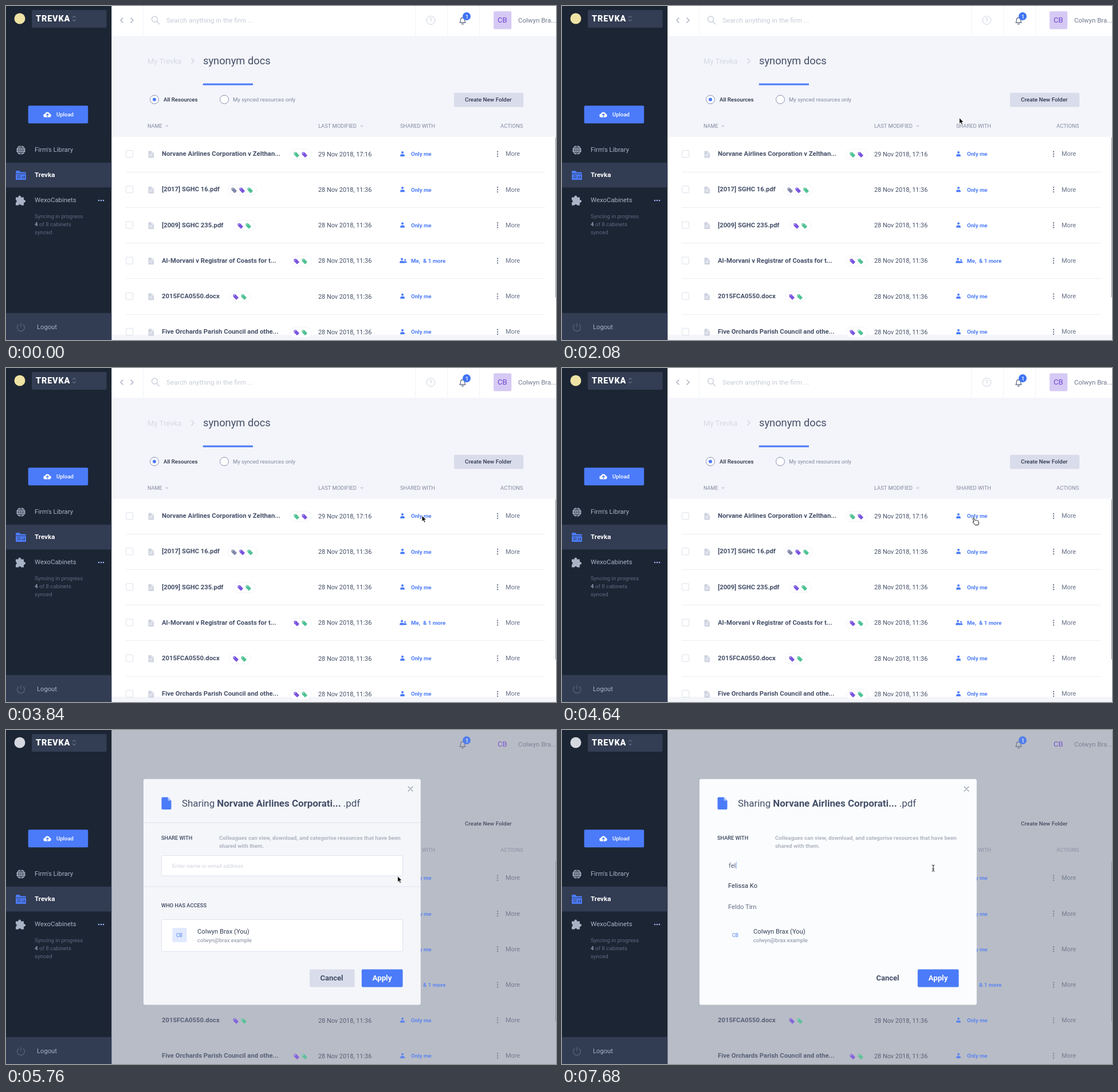
An HTML page for the animation above (8000 ms loop, 960 by 584 pixels).

```html
<!DOCTYPE html>
<html lang="en">
<head>
<meta charset="utf-8">
<title>Sharing a document</title>
<style>
  html, body { margin: 0; width: 100%; height: 100%; overflow: hidden; }
  svg { display: block; width: 960px; height: 584px; font-family: Roboto, sans-serif; }
  .line { fill: none; stroke-linecap: round; stroke-linejoin: round; }
</style>
</head>
<body>
<svg id="stage" viewBox="0 0 960 584"></svg>
<script>
const BLUE = '#4b7bf8', INK = '#444f68', GREY = '#8289a0', PALE = '#cbd0dd', RULE = '#eaedf3';
const GREEN = '#4fc294', PURPLE = '#7a55df', SLATE = '#7f88a9', NAV = '#a9b3c6';

const text = (x, y, str, size, fill = INK, weight = 400, extra = '') =>
  `<text x="${x}" y="${y}" font-size="${size}" fill="${fill}" font-weight="${weight}" ${extra}>${str}</text>`;
const rect = (x, y, w, h, fill, r = 0, stroke = 'none') =>
  `<rect x="${x}" y="${y}" width="${w}" height="${h}" rx="${r}" fill="${fill}" stroke="${stroke}"/>`;
const disc = (x, y, r, fill, stroke = 'none') =>
  `<circle cx="${x}" cy="${y}" r="${r}" fill="${fill}" stroke="${stroke}"/>`;
const shape = (d, fill, x = 0, y = 0) => `<path d="${d}" fill="${fill}" transform="translate(${x} ${y})"/>`;
const line = (d, stroke, width = 1, x = 0, y = 0) =>
  `<path class="line" d="${d}" stroke="${stroke}" stroke-width="${width}" transform="translate(${x} ${y})"/>`;
const group = (id, ...parts) => `<g id="${id}">${parts.join('')}</g>`;

const tag = (x, y, fill) =>
  shape('M-4.5-3.5q0-1 1-1h3l5 5q.6.6 0 1.200l-2.800 2.800q-.6.6-1.200 0l-5-5z', fill, x, y) + disc(x - 2.6, y - 2.6, .8, '#fff');
const person = (x, y, scale = 1) =>
  `<g transform="translate(${x} ${y}) scale(${scale})">` +
  disc(0, -2.6, 2, BLUE) + shape('M-3.800 4.500v-1.500q0-2.500 2.500-2.500h2.600q2.500 0 2.500 2.500v1.500z', BLUE) + '</g>';
const page = (x, y) =>
  shape('M0 1q0-1 1-1h5l3.500 3.500v7.500q0 1-1 1h-7.500q-1 0-1-1z', '#cdd2df', x, y) +
  line('M2 6h5M2 8.500h5M6 .500v3h3', '#fff', .9, x, y);

const rows = [
  ['Norvane Airlines Corporation v Zelthan...', 507, [GREEN, PURPLE]],
  ['[2017] SGHC 16.pdf', 398, [SLATE, PURPLE, GREEN]],
  ['[2009] SGHC 235.pdf', 409, [PURPLE, GREEN]],
  ['Al-Morvani v Registrar of Coasts for t...', 507, [PURPLE, GREEN]],
  ['2015FCA0550.docx', 401, [PURPLE, GREEN]],
  ['Five Orchards Parish Council and othe...', 507, [PURPLE, GREEN]],
].map(([name, tagX, tags], i) => ({ name, tagX, tags, i, y: 258.5 + i * 62.2 }));

// Pale parts of a row vanish under the dimmed backdrop.
const rowPale = ({ tagX, tags, i, y }) =>
  rect(209.5, y - 6, 12, 12, '#fff', 1, '#dde1ea') + page(248.5, y - 5) +
  rect(tagX - 11, y - 8, tags.length * 14 + 9, 18, '#fff', 9, '#f1f3f8') +
  (i < 5 ? rect(209, Math.round(y + 31.2), 732, 1, RULE) : '');

const rowInk = ({ name, tagX, tags, i, y }) =>
  text(272, y + 3.7, name, 11.3, INK, 600) +
  tags.map((c, k) => tag(tagX + k * 14, y + 1.5, c)).join('') +
  text(545, y + 4.3, (i ? '28 Nov 2018, 11:36' : '29 Nov 2018, 17:16'), 10.9) +
  (i === 3 ? person(691, y) + person(696.5, y + .8, .75) : person(692, y)) +
  text(707, y + 3.8, i === 3 ? 'Me,&#160; &amp; 1 more' : 'Only me', 9.7, BLUE, 600) +
  [-4, 0, 4].map(d => disc(858, y + d + .3, 1.2, '#737c92')).join('') +
  text(872, y + 3.8, 'More', 10.9, '#667087');

const sidebar = group('sidebar',
  rect(0, 0, 184.2, 584, '#1c2533'),
  '<circle id="logo" cx="24" cy="22" r="9.5"/>',
  rect(45, 7, 130.6, 31.1, '#333d53', 2),
  text(52, 27, 'TREVKA', 14.5, '#fff', 900, 'letter-spacing=".8"'),
  line('M-2.500-2l2.500-2.500 2.500 2.500M-2.500 2l2.500 2.500 2.500-2.500', '#8a94aa', 1, 119, 22),
  rect(38.7, 174.2, 104.5, 31.1, BLUE, 2),
  shape('M3 10a3 3 0 0 1-.3-6a4.200 4.200 0 0 1 8-.2a3.200 3.200 0 0 1 .3 6.200z', '#fff', 65.5, 184.5),
  line('M0 3v-5M-2 0l2-2 2 2', BLUE, 1.2, 72.3, 190.5),
  text(88, 193, 'Upload', 9.5, '#fff', 500),
  disc(26, 252, 7.8, NAV),
  line('M-8 0h16M-7-4h14M-7 4h14M0-8v16M0-8q-8 8 0 16M0-8q8 8 0 16', '#1c2533', .8, 26, 252),
  text(50, 255, 'Firm\'s Library', 11.4, NAV),
  rect(0, 273.8, 184.2, 43.5, '#323c53'),
  shape('M0 1.500q0-1.500 1.500-1.500h5l2 2.500h8q1.500 0 1.500 1.500v1h-18zM0 6h18v9q0 1-1 1h-16q-1 0-1-1z', BLUE, 17, 288),
  line('M3 9h5M3 12h5M12 10v3M15 9v4', '#323c53', 1.2, 17, 288),
  text(50, 298.5, 'Trevka', 11.6, '#fff', 700),
  shape('M0 4h4.500a2.400 2.400 0 1 1 4.600 0h4.900v4.600a2.400 2.400 0 1 1 0 4.600v4.800h-4.600a2.400 2.400 0 0 0-4.600 0h-4.800v-4.800a2.400 2.400 0 0 0 0-4.600z', NAV, 17, 330.5),
  text(50, 342.5, 'WexoCabinets', 11.4, NAV),
  [162, 166, 170].map(x => disc(x, 340, 1.3, '#9db5f5')).join(''),
  text(50, 371, 'Syncing in progress', 9.7, '#5d6a85'),
  text(50, 385, '<tspan font-weight="700" fill="#8d9ab4">4</tspan> of 8 cabinets', 9.7, '#5d6a85'),
  text(50, 399, 'synced', 9.7, '#5d6a85'),
  rect(0, 536.8, 184.2, 48, '#323c53'),
  line('M-4-5a6.500 6.500 0 1 0 8 0M0-7v6', '#5b667f', 1.2, 26, 562),
  text(54, 564.5, 'Logout', 11.2, NAV));

const pale = group('pale',
  rect(184, 0, 776, 52.2, '#fff'),
  rect(184, 228.8, 776, 346, '#fff'),
  [239, 714, 770, 826].map(x => rect(x, 0, 1, 52, '#f1f3f8')).join(''),
  line('M2-4l-4 4 4 4M16-4l4 4-4 4', '#a2a9b9', 1.3, 202, 25),
  `<g stroke-width="1.500">${disc(259.5, 23, 5, 'none', PALE)}</g>`,
  line('M263 27l4.500 4.500', PALE, 1.5),
  text(280, 29, 'Search anything in the firm ...', 11.75, '#c6cbd8'),
  disc(741.5, 25, 7.3, 'none', PALE),
  text(738.7, 29, '?', 11, PALE),
  rect(851.1, 9.3, 31.1, 31.1, '#d6c9f4', 2),
  text(247, 101, 'My Trevka', 13.1, '#d5d9e4'),
  line('M-2-4l4 4-4 4', PALE, 1.2, 326, 96),
  text(344, 102, 'synonym docs', 18.3, INK),
  rect(343.8, 135.4, 87.1, 3.1, BLUE),
  disc(259, 163.5, 7.5, '#fff', '#8792ae'), disc(259, 163.5, 3, BLUE),
  text(275, 167, 'All Resources', 9.7, '#273146', 500),
  disc(381, 163.5, 7.5, '#fff', '#8792ae'),
  text(396, 167, 'My synced resources only', 9.5, GREY),
  rect(782, 151.7, 121.2, 24.9, '#d9dcea', 2),
  [281, 621].map(x => shape('M-3-1.500h6l-3 3.500z', PALE, x, 210)).join(''),
  rows.map(rowPale).join(''));

const ink = group('ink',
  line('M-5 4h10q-1.500-1.500-1.500-5q0-3.500-3.500-3.500t-3.500 3.500q0 3.500-1.500 5zM-1.500 6.500h3', '#667087', 1.3, 797, 25),
  disc(804, 18, 7, '#3f73f2'),
  text(802, 21.5, '1', 9, '#fff', 500),
  text(858, 29, 'CB', 13, '#6c45d0'),
  text(894, 29, 'Colwyn Bra...', 11.5, '#6e778d'),
  text(801, 167, 'Create New Folder', 9.9, '#2f3950', 500),
  text(247, 213, 'NAME', 9.1, GREY),
  text(545, 213, 'LAST MODIFIED', 9.35, GREY),
  text(688, 213, 'SHARED WITH', 9.4, GREY),
  text(863, 213, 'ACTIONS', 9.5, GREY),
  rows.map(rowInk).join(''));

const modal = group('modal',
  '<rect id="sheet" x="240" y="85.700" width="483.800" height="394.800" rx="3"/>',
  line('M-4-4l8 8M4-4l-8 8', '#9299a8', 1.1, 706, 103),
  shape('M0 2q0-2 2-2h9l6 6v13.500q0 2-2 2h-13q-2 0-2-2z', BLUE, 271.5, 117.5),
  shape('M0 0v6h6z', '#a9c1fc', 282.5, 117.5),
  text(307, 134, 'Sharing <tspan font-weight="600">Norvane Airlines Corporati...</tspan> .pdf', 16.9),
  group('frames',
    rect(240, 161.5, 484, 1, '#dee2ed'), rect(240, 273.5, 484, 1, '#e2e6ef'),
    rect(271.5, 219.5, 421, 35.5, '#fff', 2, '#dfe3ee'),
    rect(271.5, 331.5, 421, 55.5, '#fff', 2, '#dfe3ee'),
    rect(290.5, 346, 25, 25, '#e0e9fd', 2),
    rect(530, 418.4, 78.5, 31.1, '#d9dcea', 2)),
  text(271, 192, 'SHARE WITH', 9.2, '#3b465e', 500),
  text(372, 191.5, 'Colleagues can view, download, and categorise resources that have been', 9.7, '#b0b4c0', 600),
  text(372, 206, 'shared with them.', 9.7, '#b0b4c0', 600),
  text(290, 240.5, 'Enter name or email address', 9.75, '#d0d4df', 400, 'id="hint"'),
  text(291, 240.5, '', 11, '#566078', 400, 'id="typed"'),
  '<rect id="caret" y="230.500" width="1" height="12" fill="#7fa3f5"/>',
  text(271, 309.5, 'WHO HAS ACCESS', 9.3, '#3b465e', 500, 'id="access"'),
  group('matches',
    text(290, 276, 'Felissa Ko', 11.2, '#273146'),
    text(290, 313, 'Feldo Tirn', 11.2, '#667087')),
  text(297, 361.5, 'CB', 8.6, '#6f96f8', 500),
  text(334, 356, 'Colwyn Brax (You)', 11.2, '#343f57'),
  text(334, 370.5, 'colwyn@brax.example', 9.5, GREY),
  text(548.5, 438, 'Cancel', 13, INK, 600),
  rect(620.8, 418.4, 71.7, 31.1, BLUE, 2),
  text(639.5, 438, 'Apply', 13.3, '#fff', 700));

const pointers = group('pointer',
  '<path id="arrow" d="M0 0v10.500l2.400-2.200 1.700 3.900 1.900-.8-1.700-3.800h3.300z" fill="#111" stroke="#fff" stroke-width=".8"/>',
  '<path id="hand" d="M0 1q1.500-2 2.600 0l1 3.500q1-1 2 0q1-.9 2 .2q1.400-.6 2 .8l.9 3.500-1 3.500h-5.500l-3.500-4.500q-.9-1.700 1.300-1.200z" fill="#fff" stroke="#111" stroke-width="1" transform="translate(-3.500 0)"/>',
  '<path id="beam" class="line" d="M-2-6q2 0 2 1.500v8q0 1.500-2 1.500M2-6q-2 0-2 1.500M2 5q-2 0-2-1.500M-1.500 1h3" stroke="#222"/>');

stage.innerHTML = '<rect id="backdrop" width="960" height="584"/>' + pale + ink +
  '<rect id="scrollbar" x="959" y="229.500" width="1" height="280" fill="#8e929b"/>' + sidebar + modal + pointers;

const $ = id => document.getElementById(id);
const show = (id, on) => $(id).setAttribute('display', on ? 'inline' : 'none');
const paint = (id, colour) => $(id).setAttribute('fill', colour);

// Pointer stops: time, x, y
const path = [
  [480, 706, -20], [960, 699, 150], [1120, 699, 150], [2080, 693.5, 195.5], [2240, 693.5, 197],
  [3360, 728, 253], [3840, 726, 258], [4480, 720.5, 262], [4960, 720.5, 262],
  [5280, 705, 260], [5600, 692, 258], [5760, 683.5, 255.5], [6400, 648, 242], [8000, 648, 242],
];
function pointerAt(t) {
  const i = path.findIndex(p => p[0] > t);
  if (i < 1) return [0, -50];
  const [t0, x0, y0] = path[i - 1], [t1, x1, y1] = path[i];
  const k = (t - t0) / (t1 - t0);
  return [x0 + (x1 - x0) * k, y0 + (y1 - y0) * k];
}

function draw(now) {
  const t = Math.floor(now % 8000 / 160) * 160;
  const open = t >= 4960, typing = t >= 7360;
  const typed = 'fel'.slice(0, Math.max(0, (t - 7200) / 160));

  paint('backdrop', open ? '#b8bcc6' : '#f4f5fa');
  paint('logo', open ? '#d5d8df' : '#eee3a4');
  paint('sheet', typing ? '#fafcfe' : '#f4f6fa');
  $('ink').setAttribute('opacity', open ? .83 : 1);
  show('pale', !open);
  show('modal', open);
  show('scrollbar', !open || t >= 5280);
  show('frames', !typing);
  show('hint', !typing);
  show('access', t < 7520);
  show('matches', t >= 7520);
  $('typed').textContent = typed;
  show('caret', t >= 6880);
  $('caret').setAttribute('x', typed ? 291.5 + $('typed').getComputedTextLength() : 290);

  const kind = t >= 6400 ? 'beam' : t >= 4000 && !open ? 'hand' : 'arrow';
  ['arrow', 'hand', 'beam'].forEach(id => show(id, id === kind));
  $('pointer').setAttribute('transform', `translate(${pointerAt(t)})`);
  requestAnimationFrame(() => draw(performance.now()));
}
draw(performance.now());
</script>
</body>
</html>
```
